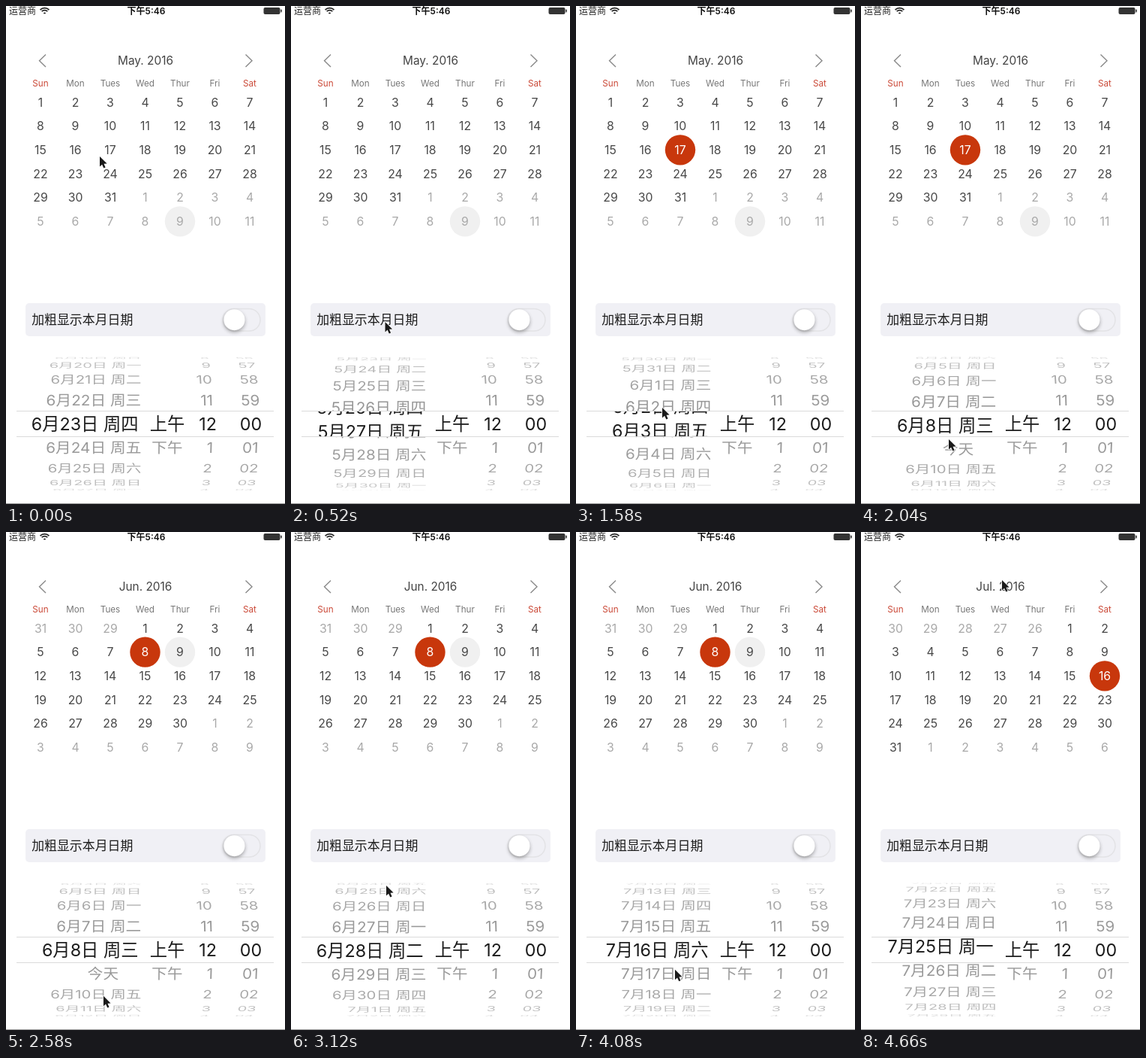
Recreate the animation shown at these times as an HTML page with a canvas. Size 372 by 662 pixels, loop 4680 ms.

```html
<!DOCTYPE html>
<html lang="zh">
<head>
<meta charset="utf-8">
<title>Calendar and date picker</title>
<style>
html, body { margin: 0; width: 100%; height: 100%; overflow: hidden; background: #fff; }
canvas { display: block; width: 372px; height: 662px; }
</style>
</head>
<body>
<canvas id="stage"></canvas>
<script>
const W = 372, H = 662, LOOP = 4680, DAY = 864e5;
const FONT = 'Inter, "Noto Sans CJK SC", "Noto Sans CJK", sans-serif';
const RED = '#c8370c', INK = '#1c1c1c';
const canvas = document.getElementById('stage');
const ctx = canvas.getContext('2d');
const dpr = window.devicePixelRatio || 1;
canvas.width = W * dpr;
canvas.height = H * dpr;

const progress = (t, from, to) => Math.max(0, Math.min(1, (t - from) / (to - from)));
const mix = (a, b, p) => a + (b - a) * p;
const easeOut = p => 1 - (1 - p) ** 2;
const easeInOut = p => p * p * (3 - 2 * p);

// Each flick decelerates to a day, counted from May 1 = 1.
const flicks = [
  { from: 140, to: 920, day: 17 },
  { from: 1047, to: 2095, day: 39 },
  { from: 2740, to: 3138, day: 59 },
  { from: 3280, to: 3620, day: 76.69 },
  { from: 3700, to: 3860, day: 77 },
  { from: 4400, to: 4769, day: 87 }
];
const pickerDay = t => flicks.reduce(
  (day, f) => mix(day, f.day, easeOut(progress(t, f.from, f.to))), 54);

// Pointer stops: time, x, y.
const stops = [[0, 125, 200], [1020, 126, 626], [1580, 115, 534], [2040, 117, 576],
  [2600, 130, 617], [3120, 127, 470], [3620, 106, 541], [3700, 106, 541],
  [4380, 150, 610], [4660, 188, 64]];

function pointer(t) {
  let [, x, y] = stops[0];
  for (let i = 1; i < stops.length; i++) {
    const p = easeInOut(progress(t, stops[i - 1][0], stops[i][0]));
    x = mix(x, stops[i][1], p);
    y = mix(y, stops[i][2], p);
  }
  return [x, y];
}

const FADE = 110;
const months = [
  { name: 'May', month: 4, pick: 17, popAt: 940 },
  { name: 'Jun', month: 5, pick: 8, popAt: 2340 },
  { name: 'Jul', month: 6, pick: 16, popAt: 4365 }
].map((m, i) => {
  const first = Date.UTC(2016, m.month, 1);
  const lead = new Date(first).getUTCDay();
  return {
    ...m, lead,
    title: `${m.name}. 2016`,
    days: new Date(Date.UTC(2016, m.month + 1, 0)).getUTCDate(),
    before: new Date(first - DAY).getUTCDate(),
    today: lead + (Date.UTC(2016, 5, 9) - first) / DAY,
    showAt: i ? m.popAt - FADE - 25 : -FADE
  };
});

function text(str, x, y, size, color, align = 'center', weight = 400) {
  ctx.font = `${weight} ${size}px ${FONT}`;
  ctx.textAlign = align;
  ctx.fillStyle = color;
  ctx.fillText(str, x, y + size * 0.365);
}

function disc(x, y, r, color) {
  ctx.beginPath();
  ctx.arc(x, y, r, 0, Math.PI * 2);
  ctx.fillStyle = color;
  ctx.fill();
}

function box(x, y, w, h, r, color) {
  ctx.beginPath();
  ctx.roundRect(x, y, w, h, r);
  ctx.fillStyle = color;
  ctx.fill();
}

function chevron(x, dir) {
  ctx.beginPath();
  ctx.moveTo(x - dir * 8.5, 64.5);
  ctx.lineTo(x, 72.7);
  ctx.lineTo(x - dir * 8.5, 81);
  ctx.strokeStyle = '#8a8a8a';
  ctx.lineWidth = 1.4;
  ctx.stroke();
}

function drawStatusBar() {
  text('运营商', 4, 6.5, 12, '#222', 'left');
  const left = -Math.PI * 0.75, right = -Math.PI * 0.25;
  ctx.strokeStyle = '#222';
  ctx.lineWidth = 1.7;
  for (const r of [8.4, 5.4, 1.6]) {
    ctx.beginPath();
    ctx.arc(51.5, 11, r, left, right);
    ctx.stroke();
  }
  text('下午5:46', 187, 6.5, 12, '#111', 'center', 600);
  box(343.5, 2, 22, 9, 2, '#333');
  box(366.3, 4.5, 1.5, 4, 0.8, '#333');
}

function drawMonth(m, t, alpha, titleShift) {
  ctx.save();
  ctx.globalAlpha = alpha;
  text(m.title, 186, 72.5 + titleShift, 15.4, '#444');
  const pop = progress(t, m.popAt, m.popAt + 60);
  const scale = pop + 0.3 * Math.sin(Math.PI * pop);
  for (let i = 0; i < 42; i++) {
    const x = 46 + i % 7 * 46.5, y = 128 + Math.floor(i / 7) * 31.67;
    const n = i - m.lead + 1;
    const inside = n >= 1 && n <= m.days;
    const label = n < 1 ? m.before - i : inside ? n : n - m.days;
    const picked = n === m.pick && pop > 0;
    if (picked) disc(x, y, 20.2 * scale, RED);
    else if (i === m.today) disc(x, y, 20.2, '#f0f0f0');
    text(label, x, y, 15.8, picked ? '#fff' : inside ? '#484848' : '#a9a9a9');
  }
  ctx.restore();
}

function drawCalendar(t) {
  chevron(44.5, -1);
  chevron(328, 1);
  ['Sun', 'Mon', 'Tues', 'Wed', 'Thur', 'Fri', 'Sat'].forEach((name, i) =>
    text(name, 46 + i * 46.5, 102.5, 11.7, i % 6 ? '#777' : '#cb4a38'));
  const current = months.filter(m => t >= m.showAt).length - 1;
  const { showAt } = months[current];
  const p = progress(t, showAt, showAt + FADE);
  if (p < 1) drawMonth(months[current - 1], t, 1 - p, -11 * p);
  drawMonth(months[current], t, p, 11 * (1 - p));
}

function drawSwitch() {
  box(26, 395, 320, 44, 5, '#f0f0f5');
  text('加粗显示本月日期', 34.2, 417, 16.9, INK, 'left');
  box(289, 402.5, 50, 29.5, 14.75, '#f0f0f5');
  ctx.strokeStyle = '#e3e3e6';
  ctx.lineWidth = 1.5;
  ctx.stroke();
  ctx.save();
  ctx.shadowColor = 'rgba(0,0,0,.32)';
  ctx.shadowBlur = 5 * dpr;
  ctx.shadowOffsetY = 2.5 * dpr;
  disc(304.5, 417.2, 14, '#fff');
  ctx.restore();
}

// Rows sit on a cylinder seen in slight perspective.
const MID = 555.4, RADIUS = 96, STEP = 19.3 * Math.PI / 180, DEPTH = 0.085;

function wheelText(str, x, offset, align, big) {
  const a = offset * STEP, sin = Math.sin(a), cos = Math.cos(a);
  const scale = 1 / (1 + DEPTH * (1 - cos));
  const shrink = -DEPTH * sin * scale * scale;
  const squash = cos * scale + sin * shrink;
  if (squash <= 0) return;
  ctx.save();
  ctx.transform(scale, 0, (x - 186) * shrink / RADIUS, squash,
    186 + (x - 186) * scale, MID + RADIUS * sin * scale);
  const color = big ? INK : `rgba(0,0,0,${0.06 + 0.36 * cos})`;
  text(str, 0, 0, big ? 23.3 : 20.8, color, align);
  ctx.restore();
}

function drawWheels(day, big) {
  const nearest = Math.round(day);
  for (let k = -4; k <= 4; k++) {
    const n = nearest + k;
    const date = new Date(Date.UTC(2016, 4, n));
    const today = n === 40;
    const label = today ? '今天'
      : `${date.getUTCMonth() + 1}月${date.getUTCDate()}日 周${'日一二三四五六'[date.getUTCDay()]}`;
    wheelText(label, today ? 150 : big ? 176.5 : 180.3, n - day, 'right', big);
    wheelText((11 + k) % 12 + 1, big ? 281 : 276.5, k, 'right', big);
    wheelText(String((60 + k) % 60).padStart(2, '0'), 326.5, k, 'center', big);
  }
  wheelText('上午', 215, 0, 'center', big);
  wheelText('下午', 215, 1, 'center', big);
}

function clipped(bands, draw) {
  ctx.save();
  ctx.beginPath();
  bands.forEach(([top, bottom]) => ctx.rect(0, top, W, bottom - top));
  ctx.clip();
  draw();
  ctx.restore();
}

function drawPicker(day) {
  clipped([[466, 538], [573, 644]], () => drawWheels(day, false));
  clipped([[538, 573]], () => drawWheels(day, true));
  ctx.fillStyle = '#dadada';
  ctx.fillRect(14, 538, 343, 1);
  ctx.fillRect(14, 572, 343, 1);
}

function drawPointer([x, y]) {
  ctx.save();
  ctx.translate(x, y);
  ctx.beginPath();
  [[0, 0], [0, 13.5], [3.1, 10.7], [5.3, 15.6], [7.6, 14.6], [5.5, 9.8], [9.6, 9.6]]
    .forEach(([px, py]) => ctx.lineTo(px, py));
  ctx.closePath();
  ctx.lineJoin = 'round';
  ctx.strokeStyle = '#fff';
  ctx.lineWidth = 1.6;
  ctx.stroke();
  ctx.fillStyle = '#1a1a1a';
  ctx.fill();
  ctx.restore();
}

function render(t) {
  ctx.setTransform(dpr, 0, 0, dpr, 0, 0);
  ctx.fillStyle = '#fff';
  ctx.fillRect(0, 0, W, H);
  drawStatusBar();
  drawCalendar(t);
  drawSwitch();
  drawPicker(pickerDay(t));
  ctx.fillStyle = '#999';
  ctx.fillRect(0, 661, W, 1);
  drawPointer(pointer(t));
}

const start = performance.now();
function tick() {
  render((performance.now() - start) % LOOP);
  requestAnimationFrame(tick);
}
tick();
</script>
</body>
</html>
```
